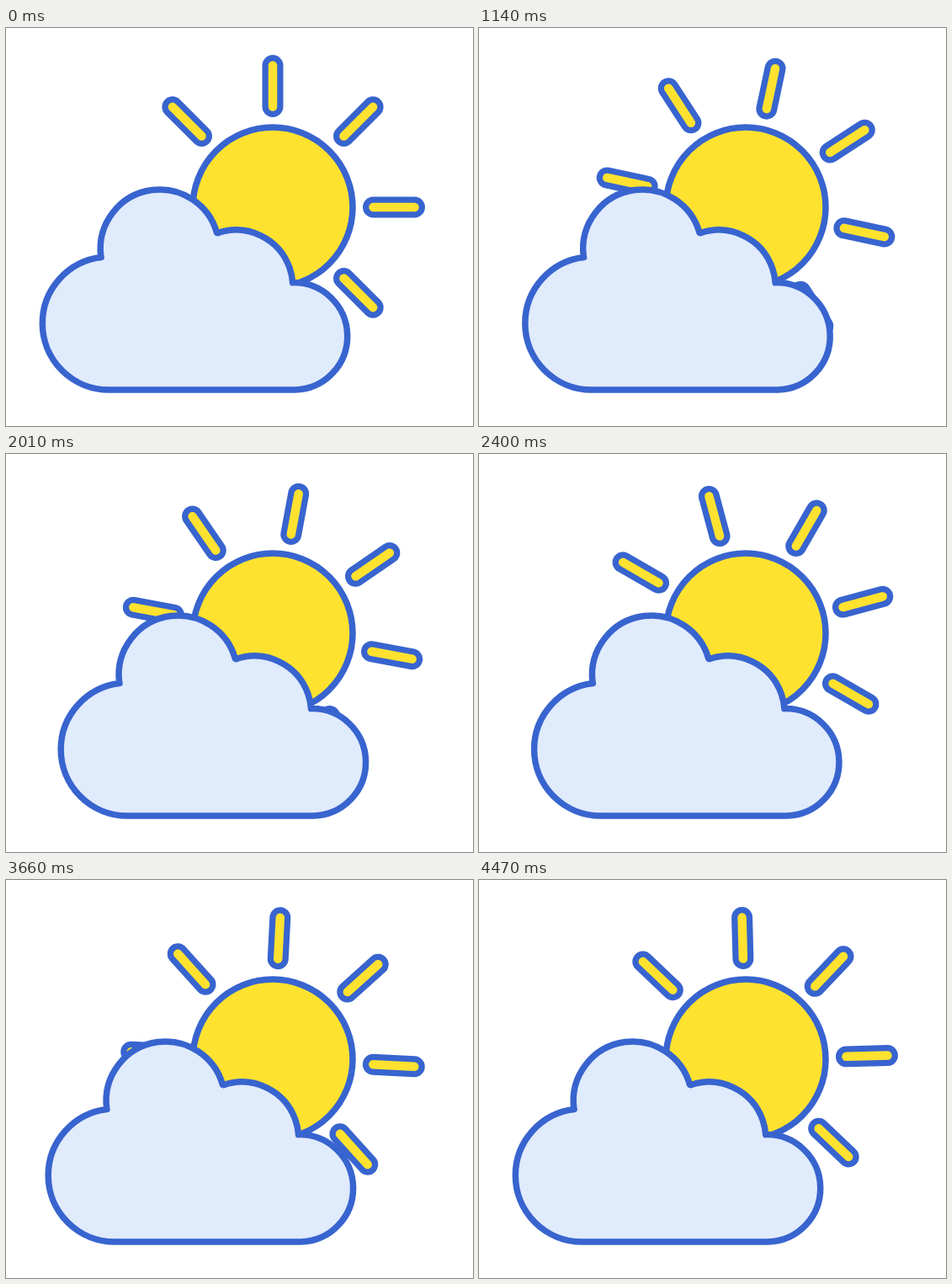
Recreate the animation shown at these times as an HTML page with a canvas. Size 555 px wide and 473 px high, loop 4500 ms.

```html
<!DOCTYPE html>
<html lang="en">
<head>
<meta charset="utf-8">
<title>Sun behind a cloud</title>
<style>
  html, body { margin: 0; width: 100%; height: 100%; overflow: hidden; background: #fff; }
  canvas { display: block; }
</style>
</head>
<body>
<canvas id="stage" width="555" height="473"></canvas>
<script>
const ctx = document.getElementById('stage').getContext('2d');
const LOOP = 4500, STEP = 30;
const BLUE = '#3864cf', YELLOW = '#fee22f', PALE = '#e0ebfc';
const LINE = 7.5;
const SUN = { x: 317, y: 213, r: 95 };
const RAY = { from: 119.5, to: 168.5, width: 25, core: 10.5, count: 8 };

// Lobes of the cloud, left to right, and the points where they meet.
const LOBES = [[122.3, 351, 79], [182.7, 262.5, 70.5], [273.5, 307.3, 67.3], [342, 366.3, 63.7]];
const JOINTS = [[113, 271.5], [251.3, 243], [340.7, 302.8]];

function outlined(path, fill) {
  ctx.fillStyle = fill;
  ctx.strokeStyle = BLUE;
  ctx.lineWidth = LINE;
  ctx.lineJoin = 'round';
  ctx.fill(path);
  ctx.stroke(path);
}

function makeCloud() {
  const path = new Path2D();
  const angleTo = ([x, y], [px, py]) => Math.atan2(py - y, px - x);
  LOBES.forEach((lobe, i) => {
    const start = i ? angleTo(lobe, JOINTS[i - 1]) : Math.PI / 2;
    const end = i < JOINTS.length ? angleTo(lobe, JOINTS[i]) : Math.PI / 2;
    path.arc(...lobe, start, end);
  });
  path.closePath();
  return path;
}

const cloud = makeCloud();
const disc = new Path2D();
disc.arc(0, 0, SUN.r, 0, Math.PI * 2);

function drawRay(color, width) {
  ctx.strokeStyle = color;
  ctx.lineWidth = width;
  ctx.lineCap = 'round';
  ctx.beginPath();
  ctx.moveTo(0, -RAY.from);
  ctx.lineTo(0, -RAY.to);
  ctx.stroke();
}

function drawSun(turn) {
  ctx.save();
  ctx.translate(SUN.x, SUN.y);
  outlined(disc, YELLOW);
  ctx.rotate(turn);
  for (let i = 0; i < RAY.count; i++) {
    drawRay(BLUE, RAY.width);
    drawRay(YELLOW, RAY.core);
    ctx.rotate(Math.PI * 2 / RAY.count);
  }
  ctx.restore();
}

function drawCloud(shift) {
  ctx.save();
  ctx.translate(shift, 0);
  outlined(cloud, PALE);
  ctx.restore();
}

function draw(time) {
  const phase = Math.floor(time % LOOP / STEP) * STEP / LOOP;
  ctx.fillStyle = '#fff';
  ctx.fillRect(0, 0, 555, 473);
  // Five ray spacings per loop, so the turn closes without a jump.
  drawSun(phase * 5 * Math.PI * 2 / RAY.count);
  drawCloud(11.25 * (1 - Math.cos(phase * Math.PI * 2)));
}

let began;
function tick(now) {
  began ??= now;
  draw(now - began);
  requestAnimationFrame(tick);
}
draw(0);
requestAnimationFrame(tick);
</script>
</body>
</html>
```
